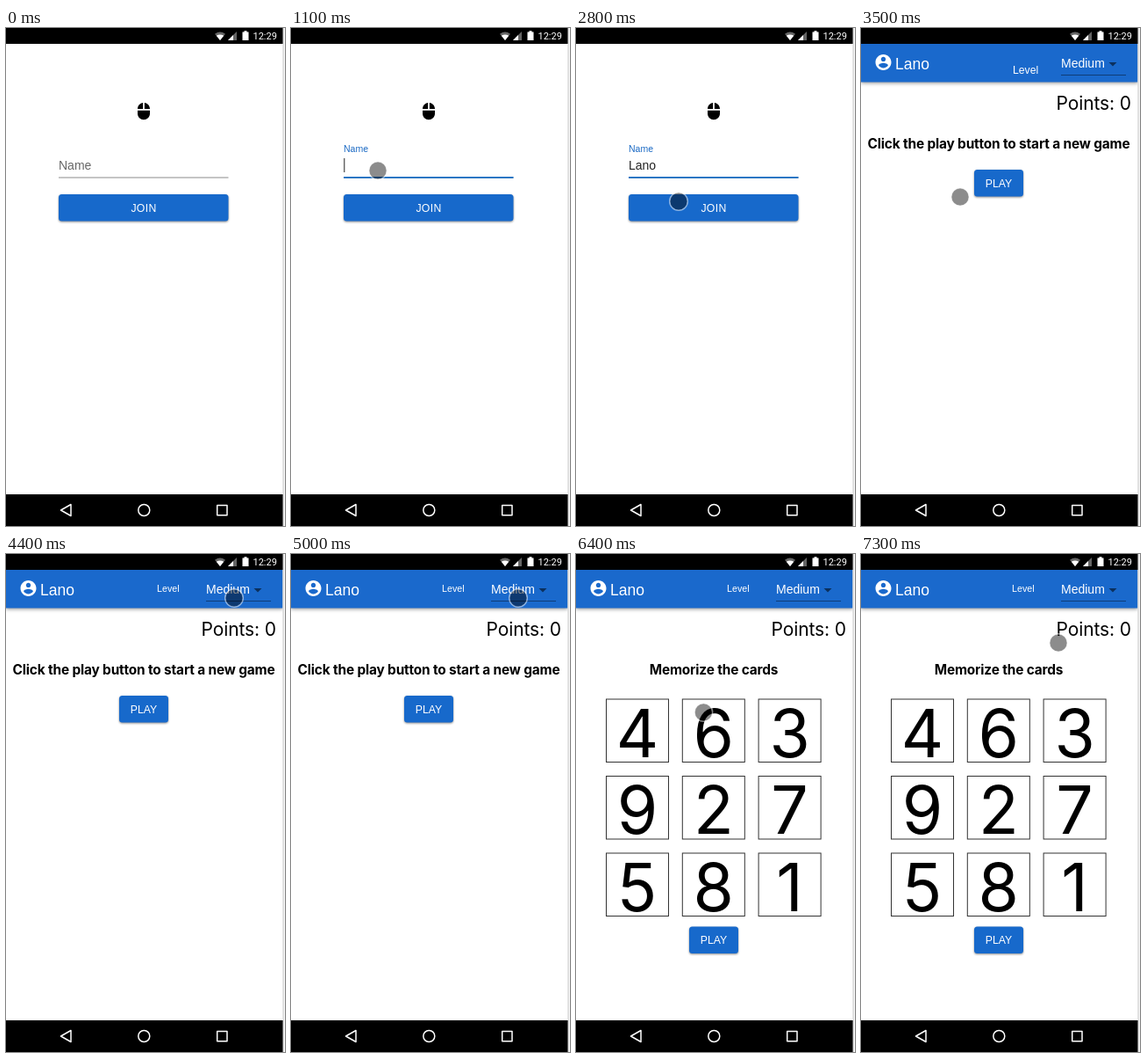
Write an HTML page that moves like this. It is 318 by 566 pixels and loops after 8 s.

```html
<!DOCTYPE html>
<html lang="en">
<head>
<meta charset="utf-8">
<title>Memory game</title>
<style>
  html, body { margin: 0; width: 100%; height: 100%; overflow: hidden; background: #fff; }
  svg { display: block; width: 318px; height: 566px; }
  text { font-family: "Liberation Sans", Arial, sans-serif; font-size: 14px; white-space: pre; }
  .btn rect { fill: #1769cb; filter: drop-shadow(0 1px 1.3px rgba(0, 0, 0, .45)); }
  .btn text { fill: #fff; font-size: 12.25px; text-anchor: middle; }
  .ui { font-family: Inter, sans-serif; }
  .title { font-size: 15.4px; font-weight: 700; letter-spacing: -.15px; text-anchor: middle; }
  .points { font-size: 21px; letter-spacing: -.1px; text-anchor: end; }
  .digit { font-size: 75px; text-anchor: middle; }
  .card { fill: #fff; stroke: #333; }
  .bar { fill: #1a69cc; filter: drop-shadow(0 1.5px 2px rgba(0, 0, 0, .45)); }
</style>
</head>
<body>
<svg viewBox="0 0 318 566">
  <rect width="318" height="566" fill="#fff"/>

  <g id="login">
    <path transform="translate(146.5 84) scale(.875)" d="M13 1.07V9h7c0-4.08-3.05-7.44-7-7.93zM4 15c0 4.42 3.58 8 8 8s8-3.58 8-8v-4H4v4zm7-13.93C7.05 1.56 4 4.92 4 9h7V1.07z"/>
    <text id="label">Name</text>
    <text id="typed" x="60" y="161" fill="#222"></text>
    <rect id="caret" y="148" width="1" height="16" fill="#222"/>
    <rect x="60" y="169.5" width="193.5" height="1" fill="#8c8c8c"/>
    <rect id="focus" y="169" height="1.8" fill="#1a6fc4"/>
    <g class="btn">
      <rect x="60" y="189" width="193.5" height="30.5" rx="3.5"/>
      <text x="157" y="209" letter-spacing=".3">JOIN</text>
    </g>
  </g>

  <g id="game">
    <rect class="bar" y="18" width="315.5" height="43.5"/>
    <path fill="#fff" transform="translate(14.7 28.2) scale(.9)" d="M12 2C6.48 2 2 6.48 2 12s4.48 10 10 10 10-4.48 10-10S17.52 2 12 2zm0 3c1.66 0 3 1.34 3 3s-1.34 3-3 3-3-1.34-3-3 1.34-3 3-3zm0 14.2c-2.5 0-4.71-1.28-6-3.22.03-1.99 4-3.08 6-3.08 1.99 0 5.97 1.09 6 3.08-1.29 1.94-3.5 3.22-6 3.22z"/>
    <text id="player" x="39" y="46.5" fill="#fff" style="font-size:17.5px"></text>
    <text id="level" fill="#fff">Level</text>
    <text x="228" y="45" fill="#fff">Medium</text>
    <path d="M282.5 39h9l-4.5 4.5z" fill="#000" fill-opacity=".54"/>
    <rect x="228" y="53" width="74" height="1" fill-opacity=".42"/>
    <text class="ui points" x="308" y="92.5">Points: 0</text>
    <text id="title" class="ui title" x="157" y="137"></text>
    <g id="cards"></g>
    <g id="play" class="btn">
      <rect x="129" y="161" width="56" height="30.5" rx="3.5"/>
      <text x="157" y="180.5">PLAY</text>
    </g>
  </g>

  <rect x="315.5" width="2.5" height="566" fill="#f6f6f6"/>
  <rect x="315.5" width="1" height="566" fill="#c9c9c9"/>
  <rect width="315.5" height="18"/>
  <rect y="530" width="315.5" height="36"/>
  <g fill="#fff">
    <path d="M238 6.8Q244 2.4 250 6.8L244 14z" fill-opacity=".4"/>
    <path d="M239.8 8.8Q244 6 248.2 8.8L244 14z"/>
    <path d="M263 4v10h-10z" fill-opacity=".4"/>
    <path d="M259 8v6h-6z"/>
    <path d="M269.5 4.5h2v-1.2h3v1.2h2V14h-7z"/>
    <text x="281.5" y="13" style="font-family:Roboto,sans-serif;font-size:11px">12:29</text>
  </g>
  <g fill="none" stroke="#fff" stroke-width="1.5" stroke-linejoin="round">
    <path d="M62.5 548l11.5-6.5v13z"/>
    <circle cx="157.3" cy="548" r="6.5"/>
    <rect x="240.7" y="542.5" width="11.3" height="11.3"/>
  </g>

  <g id="pointer">
    <circle r="10" fill-opacity=".45"/>
    <circle r="10.3" fill="none" stroke="#fff" stroke-opacity=".5" stroke-width="1.5"/>
  </g>
</svg>
<script>
const LOOP = 8000, TICK = 100;
const NAME = "Lano";
const KEY_TIMES = [1500, 1900, 2000, 2100];
const GAME_AT = 3400, CARDS_AT = 5900;

// Pointer stops: time, x, y
const STOPS = [
  [300, 30, 77], [700, 82, 168], [1000, 99, 162], [2500, 99, 162],
  [2700, 117, 197], [3000, 117, 197], [3200, 113, 192], [3500, 113, 192],
  [4200, 260, 50], [4400, 260, 50], [4700, 266, 44], [5000, 259, 50],
  [5100, 259, 50], [5500, 143, 176], [5700, 143, 176], [6700, 146, 181],
  [7300, 225, 101]
];

const $ = id => document.getElementById(id);
const set = (id, attrs) => {
  for (const k in attrs) $(id).setAttribute(k, attrs[k]);
};
const show = (id, on) => set(id, { visibility: on ? "visible" : "hidden" });
const mix = (a, b, p) => a + (b - a) * p;
const ease = (t, start, length) => {
  const p = Math.min(1, Math.max(0, (t - start) / length));
  return p * p * (3 - 2 * p);
};

$("player").textContent = NAME;
$("cards").innerHTML = [..."463927581"].map((digit, i) => {
  const x = 34.5 + 86.8 * (i % 3), y = 165 + 87.5 * Math.floor(i / 3);
  return `<rect class="card" x="${x}" y="${y}" width="71" height="71.5"/>
    <text class="ui digit" x="${x + 35.5}" y="${y + 65.5}">${digit}</text>`;
}).join("");

function pointerAt(t) {
  const i = STOPS.findIndex(s => s[0] > t);
  if (i < 0) return STOPS[STOPS.length - 1].slice(1);
  if (i === 0) return STOPS[0].slice(1);
  const [t0, x0, y0] = STOPS[i - 1], [t1, x1, y1] = STOPS[i];
  const p = ease(t, t0, t1 - t0);
  return [mix(x0, x1, p), mix(y0, y1, p)];
}

function drawLogin(t) {
  const p = ease(t, 800, 200);
  set("label", { x: 60, y: mix(161, 141, p), fill: p > 0 ? "#1a69c4" : "#666" });
  $("label").style.fontSize = mix(14, 10.5, p) + "px";
  set("focus", { x: 156.75 - 96.75 * p, width: 193.5 * p });

  const count = KEY_TIMES.filter(k => k <= t).length;
  $("typed").textContent = NAME.slice(0, count);
  set("caret", { x: 60.3 + 7.8 * count });
  show("caret", t < GAME_AT && (t >= 900 && t < 1300 || t >= 1500 && t < 2500));
}

function drawGame(t) {
  const p = ease(t, 3500, 200), dealt = t >= CARDS_AT;
  set("level", { x: mix(173, 172, p), y: mix(52, 42.5, p) });
  $("level").style.fontSize = mix(12.2, 10.7, p) + "px";
  $("title").textContent = dealt ? "Memorize the cards" : "Click the play button to start a new game";
  show("cards", dealt);
  set("play", { transform: `translate(0 ${dealt ? 262.5 : 0})` });
}

function draw(t) {
  const playing = t >= GAME_AT;
  set("login", { display: playing ? "none" : "inline" });
  set("game", { display: playing ? "inline" : "none" });
  if (playing) drawGame(t); else drawLogin(t);
  show("pointer", t >= 300 && t < 1200 || t >= 2500);
  set("pointer", { transform: `translate(${pointerAt(t)})` });
}

const start = performance.now();
function loop() {
  const t = (performance.now() - start) % LOOP;
  draw(Math.floor(t / TICK) * TICK);
  requestAnimationFrame(loop);
}
loop();
</script>
</body>
</html>
```
